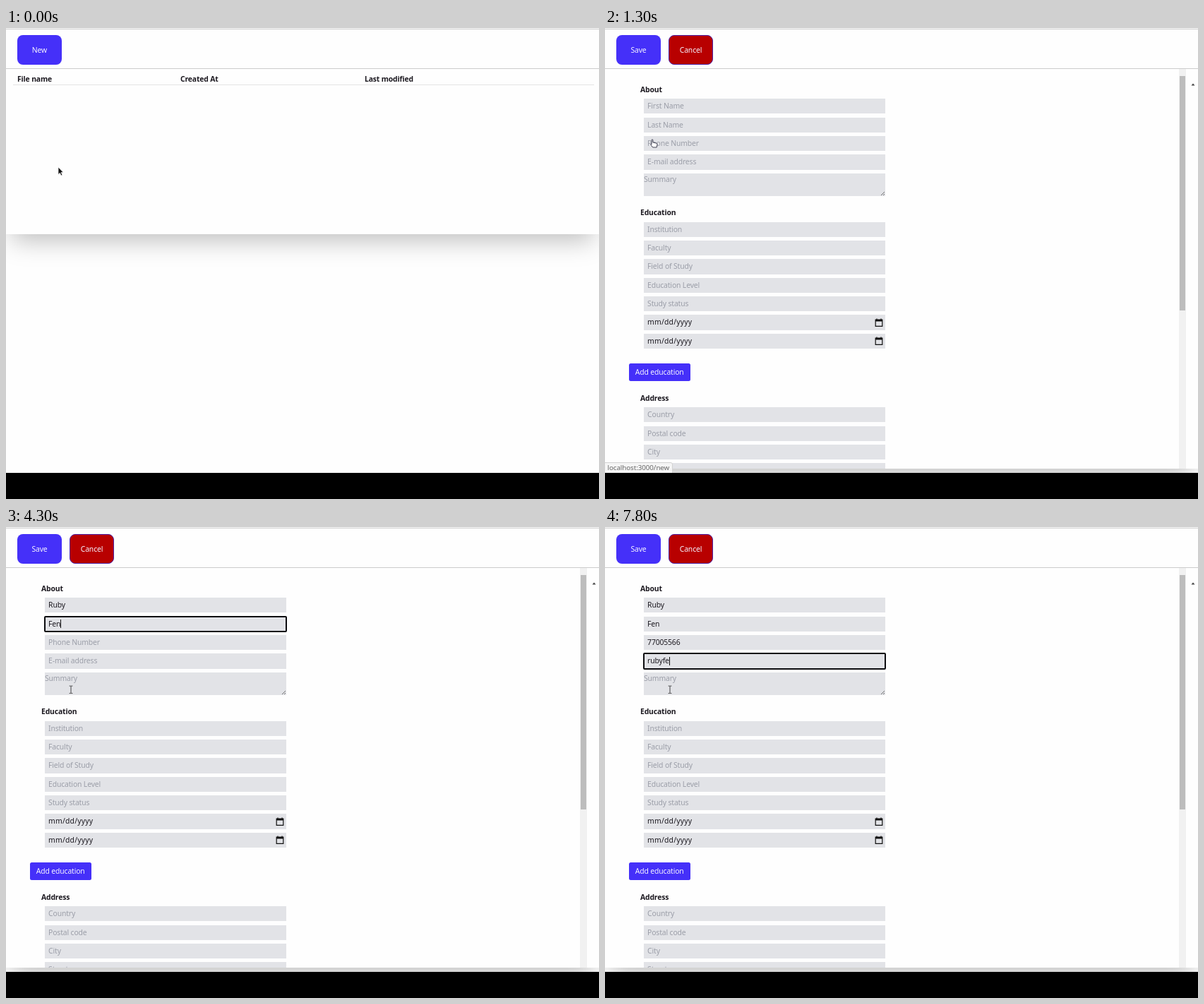
Animation of 840x667 px, one loop 8 s. Source, as an HTML page:

```html
<!DOCTYPE html>
<html lang="en">
<head>
<meta charset="utf-8">
<title>New record form</title>
<style>
html, body { margin: 0; width: 100%; height: 100%; overflow: hidden; background: #fefefe; }
#stage { position: relative; width: 840px; height: 667px; overflow: hidden; color: #1c1920;
  font: 10.4px/16px "Noto Sans", "Open Sans", sans-serif; letter-spacing: -.15px; white-space: pre; }
#stage div, svg { position: absolute; box-sizing: border-box; }
#panel { left: 0; top: 1px; width: 840px; background: #fefefe; border-top: 1.5px solid #ccc;
  box-shadow: 0 17px 33px -8px rgba(0,0,0,.25); }
#rule { top: 56.5px; width: 840px; height: 1.5px; background: #ccc; }
#list, #form { left: 0; top: 0; width: 840px; height: 623.5px; overflow: hidden; }
#headline { left: 10px; top: 80px; width: 823px; height: 1px; background: #e4e4e4; }
.bold { font-weight: 700; }
.button { top: 9.5px; width: 63px; height: 42px; border-radius: 8px; background: #4530f9;
  color: #f4f3ff; line-height: 42px; text-align: center; }
#cancel { left: 90px; background: #b80000; border: 1px solid #4a20a8; line-height: 40px; }
#add { left: 34px; top: 475px; width: 86.5px; height: 25px; border-radius: 2.5px; line-height: 25px; }
.field { left: 54.5px; width: 342px; height: 21.2px; padding-left: 5.6px; line-height: 21.2px;
  background: #e2e3e7; }
.hint { color: #9b9ea8; }
.date { letter-spacing: .2px; }
.area { height: 31.5px; padding-left: .5px; line-height: 16px; }
.focus { outline: 2px solid #0d0d10; outline-offset: -1px; border-radius: 1px; }
.caret { display: inline-block; width: 1px; height: 12px; margin-right: -1px;
  vertical-align: -2.5px; background: #111; }
#track { left: 813px; top: 58px; width: 9.5px; height: 566px; background: #f1f1f1; }
#thumb { left: 1px; top: 10px; width: 8px; height: 332px; background: #bdbdbd; }
#status { left: -1px; top: 615px; width: 97px; height: 16px; padding-left: 3.5px; line-height: 14px;
  border: 1px solid #d2d2d2; border-radius: 0 3px 0 0; background: #f5f5f5; color: #666;
  font-size: 9.8px; letter-spacing: -.08px; }
#floor { top: 630px; width: 840px; height: 37px; background: #000; }
</style>
</head>
<body>
<div id="stage">
  <div id="panel"></div>
  <div id="list">
    <div class="bold" style="left:16px;top:64px">File name</div>
    <div class="bold" style="left:247px;top:64px">Created At</div>
    <div class="bold" style="left:508px;top:64px">Last modified</div>
    <div id="headline"></div>
  </div>
  <div id="form">
    <div class="button" id="cancel">Cancel</div>
    <div class="button" id="add">Add education</div>
    <div id="track"><div id="thumb"></div>
      <svg width="10" height="566" fill="#444"><path d="M2.5 7.5 5 4.5 7.5 7.5zM2.5 558.5 5 561.5 7.5 558.5z"/></svg>
    </div>
  </div>
  <div id="rule"></div>
  <div class="button" id="main" style="left:16px"></div>
  <div id="status">localhost:3000/new</div>
  <div id="floor"></div>
  <svg width="840" height="667"><g id="cursor">
    <path id="arrow" d="M0 0V10.5L2.4 8.3 4 12 5.8 11.2 4.2 7.6H7.2z" fill="#111" stroke="#fff" stroke-width=".7"/>
    <path id="hand" d="M-.9.4Q0-.9 .9.4V4L6.2 5.2Q7.2 5.6 7 7L6.2 11H.6L-2.2 7.2Q-2.6 5.8-.9 6.6z" fill="#fff" stroke="#15152a" stroke-width=".8"/>
    <path id="beam" d="M-2.3-5.2H-.7L0-4.6 .7-5.2H2.3M0-4.6V4.6M-2.3 5.2H-.7L0 4.6 .7 5.2H2.3" fill="none" stroke="#333" stroke-width=".9"/>
  </g></svg>
</div>
<script>
const $ = id => document.getElementById(id);
const form = $('form');
const LOOP = 8000, STEP = 100, OPEN = 1300;

function add(cls, y, html, style = '') {
  const el = document.createElement('div');
  el.className = cls;
  el.style.cssText = `top:${y}px;${style}`;
  el.innerHTML = html;
  form.append(el);
  return el;
}
const heading = (y, text) => add('bold', y - 8, text, 'left:50px');
const fields = (y, labels) => labels.map((label, i) => add('field hint', y - 10.6 + i * 26.4, label));

const calendar = `<svg style="left:327px;top:4.5px" width="12" height="13">
  <path d="M1.2 2.2H10.8V11.3H1.2zM3 .4V2M9 .4V2" fill="none" stroke="#111" stroke-width="1.2"/>
  <path d="M1 2H11V4.5H1z" fill="#111"/></svg>`;
const grip = `<svg style="left:335px;top:25px" width="7" height="7">
  <path d="M1 6 6 1M4 6 6 4" stroke="#555" stroke-width=".8"/></svg>`;

heading(87, 'About');
const labels = ['First Name', 'Last Name', 'Phone Number', 'E-mail address'];
const inputs = fields(110.8, labels);
add('field hint area', 206, 'Summary' + grip);
heading(261, 'Education');
fields(285.2, ['Institution', 'Faculty', 'Field of Study', 'Education Level', 'Study status']);
for (const y of [406.4, 432.8]) add('field date', y, 'mm/dd/yyyy' + calendar);
heading(524, 'Address');
fields(547.8, ['Country', 'Postal code', 'City', 'Street']);

// Typed text, focus time and key times for each input
const typing = [
  ['Ruby', 2000, [3000, 3200, 3400, 3500]],
  ['Fen', 3600, [3900, 4100, 4300]],
  ['77005566', 4400, [4700, 4900, 5200, 5400, 5500, 5600, 5800, 5900]],
  ['rubyfe', 6500, [7300, 7400, 7500, 7700, 7700, 7800]]
];

// Pointer path: time, x, y
const path = [[0, 69, 69], [300, 69, 69], [400, 67, 39], [500, 67, 39], [800, 62, 30], [1300, 62, 30],
  [1800, 88, 107.5], [2200, 88, 107.5], [2300, 87, 102.3], [LOOP, 87, 102.3]];

const clamp = v => Math.max(0, Math.min(1, v));
const show = (el, on) => el.style.display = on ? '' : 'none';

function pointer(t) {
  const i = path.findIndex(p => p[0] > t);
  const [t0, x0, y0] = path[i - 1], [t1, x1, y1] = path[i];
  const k = (t - t0) / (t1 - t0);
  const x = x0 + (x1 - x0) * k, y = y0 + (y1 - y0) * k;
  $('cursor').setAttribute('transform', `translate(${x} ${y})`);
  show($('hand'), y < 52);
  show($('arrow'), y >= 52 && y < 100);
  show($('beam'), y >= 100);
}

function type(t) {
  typing.forEach(([text, start, keys], i) => {
    const el = inputs[i];
    const count = keys.filter(k => k <= t).length;
    const focus = t >= start && (i === 3 || t < typing[i + 1][1]);
    const blink = i === 0 && t >= 2500 && t < 3000;
    const caret = focus && !blink ? '<span class="caret"></span>' : '';
    el.className = 'field' + (count ? '' : ' hint') + (focus ? ' focus' : '');
    el.style.background = focus && i === 0 ? '#e5e1e9' : '';
    el.innerHTML = count ? text.slice(0, count) + caret : caret + labels[i];
  });
}

function draw(t) {
  const open = t >= OPEN;
  show($('list'), !open);
  show(form, open);
  $('panel').style.height = (open ? 623 : 291) + 'px';

  const main = $('main'), k = open ? 0 : clamp((t - 350) / 400);
  main.textContent = open ? 'Save' : 'New';
  main.style.background = `rgb(${69 - 13 * k},${48 - 7 * k},${249 - 47 * k})`;
  main.style.boxShadow = t === 1200 ? '0 0 0 1.5px #b3bcf6' : '';

  $('status').style.opacity = t < 1500 ? clamp((t - 500) / 300) : 0;
  pointer(t);
  type(t);
}

function frame() {
  draw(Math.floor(performance.now() % LOOP / STEP) * STEP);
  requestAnimationFrame(frame);
}
frame();
</script>
</body>
</html>
```
